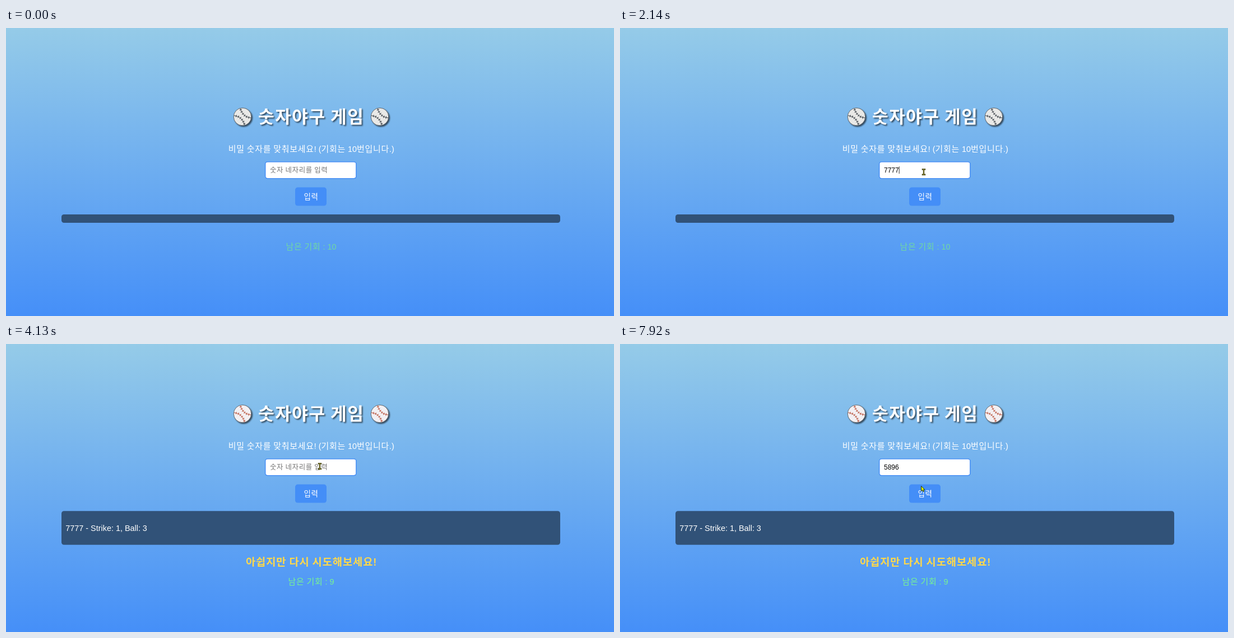
Animation, 1085 px wide and 516 px high, one loop 7990 ms. Source, as an HTML page:

```html
<!DOCTYPE html>
<html lang="ko">
<head>
<meta charset="utf-8">
<title>숫자야구 게임</title>
<style>
  html, body { margin: 0; width: 100%; height: 100%; overflow: hidden; }
  svg { display: block; width: 100%; height: 100%; }
  text { white-space: pre; font-family: "Liberation Sans", Arial, sans-serif; }
  .ko { font-family: "Noto Sans CJK KR", "Noto Sans CJK", sans-serif; }
  #title { filter: drop-shadow(2.2px 2.2px 1.3px rgba(0, 0, 0, .6)); }
</style>
</head>
<body>
<svg viewBox="0 0 1085 516" preserveAspectRatio="none">
  <defs>
    <linearGradient id="sky" x2="0" y2="1">
      <stop stop-color="#95cbe8"/>
      <stop offset="1" stop-color="#458ff8"/>
    </linearGradient>
    <g id="ball">
      <circle r="15.8" stroke="#4a4d52" stroke-width=".8"/>
      <g fill="none" stroke="currentColor">
        <g id="seam">
          <path d="M-4 -15C-1 -5 5 1 15 2" stroke-width="1"/>
          <path d="M-4 -15C-1 -5 5 1 15 2" stroke-width="4.4" stroke-dasharray="1 3.2" stroke-dashoffset="-2"/>
        </g>
        <use href="#seam" transform="rotate(180)"/>
      </g>
    </g>
  </defs>
  <rect width="1085" height="516" fill="url(#sky)"/>
  <g id="panel">
    <g id="title">
      <use href="#ball" x="422" y="159"/>
      <use href="#ball" x="667" y="159"/>
    </g>
    <rect x="462.7" y="239.9" width="162.2" height="29.7" rx="4" fill="#fff" stroke="#3f89f5" stroke-width="1.4"/>
    <rect id="button" x="516" y="285.6" width="56" height="33" rx="4.5"/>
    <rect id="caret" y="248" width="1" height="13" fill="#333"/>
  </g>
  <rect id="log" x="99" width="890" rx="4.5" fill="#315278"/>
  <g id="result"></g>
  <g id="cursors" stroke-linejoin="round">
    <path id="arrow" d="M.5 .5V9.6L2.7 7.7L4.2 10.8L5.7 10.1L4.3 7.1H7Z" fill="#d4f000" stroke="#25300c" stroke-width=".9"/>
    <g id="ibeam" fill="none">
      <path d="M-3.2 -4.8H3.2M0 -4.8V4.8M-3.2 4.8H3.2" stroke="#3a3b12" stroke-width="2.4"/>
      <path d="M-2.4 -4.8H2.4M0 -4.8V4.8M-2.4 4.8H2.4" stroke="#a9a03c" stroke-width=".8"/>
    </g>
    <path id="hand" d="M-1.6 -5.2Q-.6 -6.2 0 -5V-2.2L3.6 -1.4Q4.4 -1 4.2 .4L3.2 4.6H-1.6L-4.4 .8Q-4.2 -.8 -2.6 .2L-1.6 .8Z" fill="#f4d91c" stroke="#6b5a18" stroke-width=".8"/>
  </g>
</svg>
<script>
const LOOP = 7990, GUESS = 2670, STEP = 66.5;
const SVG = "http://www.w3.org/2000/svg";
const $ = id => document.getElementById(id);

function set(node, attrs) {
  for (const name in attrs) node.setAttribute(name, attrs[name]);
  return node;
}
const show = (node, on) => set(node, { visibility: on ? "visible" : "hidden" });
const make = (parent, tag, attrs) =>
  parent.appendChild(set(document.createElementNS(SVG, tag), attrs));

// Hangul runs get their own face, slightly larger and looser than the Latin ones.
function label(parent, words, x, y, size, fill, anchor = "middle", weight = 400) {
  const node = make(parent, "text",
    { x, y, fill, "font-size": size, "font-weight": weight, "text-anchor": anchor });
  for (const run of words.match(/[가-힣]+|[^가-힣]+/g)) {
    const korean = /[가-힣]/.test(run);
    make(node, "tspan", korean
      ? { class: "ko", "font-size": size * 1.04, "letter-spacing": size * .05 }
      : {}).textContent = run;
  }
  return node;
}

const panel = $("panel"), result = $("result"), svg = document.querySelector("svg");
label($("title"), "숫자야구 게임", 544.7, 169.5, 30, "#fff", "middle", 700);
label(panel, "비밀 숫자를 맞춰보세요! (기회는 10번입니다.)", 544.8, 222, 14.4, "#fff");
label(panel, "입력", 544.6, 306.8, 13, "#fff");
const hint = label(panel, "숫자 네자리를 입력", 471, 259, 12, "#757575", "start");
const entry = make(panel, "text", { x: 471, y: 259, "font-size": 12, fill: "#000" });
const tenLeft = label(svg, "남은 기회 : 10", 544.5, 396.5, 14.4, "#70d8a2");
label(result, "7777 - Strike: 1, Ball: 3", 106.3, 334.8, 14.4, "#fff", "start");
label(result, "아쉽지만 다시 시도해보세요!", 544.6, 396.5, 18, "#ffd84a", "middle", 700);
label(result, "남은 기회 : 9", 544.5, 430.5, 14.4, "#78f590");
svg.appendChild($("cursors"));

// Each stroke is a list of [time, x, y]; the pointer rests between strokes.
const strokes = [
  [[120, 996, 505], [250, 780, 420], [385, 560, 350], [520, 461, 305], [650, 506, 285]],
  [[790, 509, 283], [990, 528, 268], [1190, 542, 258]],
  [[GUESS, 544, 267]],
  [[3400, 548, 247], [3470, 551, 240], [3670, 564, 218], [4130, 560, 219]],
  [[7520, 560, 219], [7640, 556, 212], [7780, 546, 229], [7920, 537, 254]]
];

function pointer(t) {
  const path = strokes.filter(s => s[0][0] <= t).pop();
  if (!path) return null;
  const start = path[0][0], last = path[path.length - 1];
  if (t >= last[0]) return last.slice(1);
  const tick = start + Math.floor((t - start) / STEP + .02) * STEP;
  const i = path.findIndex(p => p[0] > tick);
  const [a, b] = [path[i - 1], path[i]];
  const k = (tick - a[0]) / (b[0] - a[0]);
  return [a[1] + (b[1] - a[1]) * k, a[2] + (b[2] - a[2]) * k];
}

const typed = (word, times, t) => word.slice(0, times.filter(at => at <= t).length);

// Times at which the caret switches on or off, starting hidden.
const blinks = [1060, 1590, 1730, GUESS, 3200, 3730, 4260, 4790, 5340, 5870, 6400, 7520];

function draw(t) {
  const after = t >= GUESS, lift = after ? 34 : 0;
  const value = after
    ? typed("5896", [6400, 6600, 6800, 7000], t)
    : typed("7777", [1730, 1860, 2010, 2140], t);
  const pressed = after && t < 3400;

  set(panel, { transform: `translate(0 ${-lift})` });
  set($("title"), { fill: after ? "#f3f0f3" : "#e9e9e7", color: after ? "#b9553f" : "#3b4148" });
  set($("button"), { fill: pressed ? "#244f8a" : "#448ef7" });
  set($("log"), after ? { y: 299.2, height: 60.5 } : { y: 334, height: 15 });
  show(result, after);
  show(tenLeft, !after);

  entry.textContent = value;
  show(hint, !value);
  set($("caret"), { x: 471 + value.length * 6.674 });
  show($("caret"), blinks.filter(at => at <= t).length % 2);

  const spot = pointer(t);
  let kind = "";
  if (spot) {
    const [x, y] = spot, row = y + lift;
    const inField = x > 462 && x < 625 && row > 239 && row < 270;
    kind = pressed ? "hand" : inField ? "ibeam" : "arrow";
    set($("cursors"), { transform: `translate(${x} ${y})` });
  }
  for (const id of ["arrow", "ibeam", "hand"]) show($(id), id === kind);
}

const begin = performance.now();
function loop() {
  draw((performance.now() - begin) % LOOP);
  requestAnimationFrame(loop);
}
loop();
</script>
</body>
</html>
```
